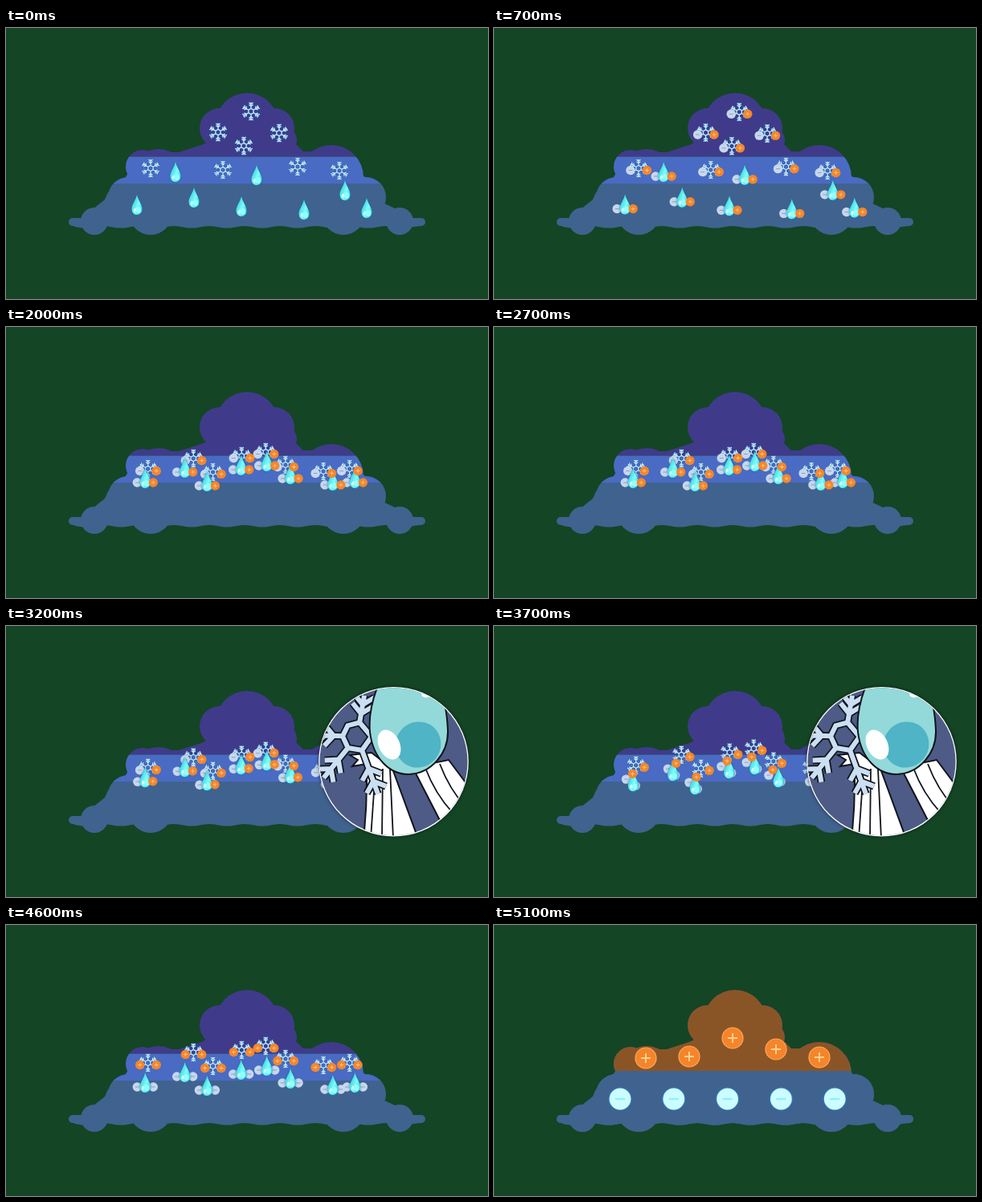
An HTML page with a canvas that plays this animation: 600x338 px, repeating every 5.2 s.

```html
<!DOCTYPE html>
<html lang="en">
<head>
<meta charset="utf-8">
<title>Charge separation in a storm cloud</title>
<style>
html, body { margin: 0; height: 100%; overflow: hidden; background: #144525; }
canvas { display: block; width: 100vw; height: 100vh; }
</style>
</head>
<body>
<canvas id="stage" width="600" height="338"></canvas>
<script>
const ctx = document.getElementById('stage').getContext('2d');
const LOOP = 5200, STEP = 100, TAU = Math.PI * 2, RAD = TAU / 360;

// Where each flake and drop start, and the point around which they collide
const pairs = [
  { flake: [180, 175], drop: [163, 221], meet: [175, 183] },
  { flake: [264, 130], drop: [211, 180], meet: [228, 170] },
  { flake: [270, 177], drop: [234, 212], meet: [254, 187] },
  { flake: [296, 147], drop: [293, 223], meet: [293, 167] },
  { flake: [305, 104], drop: [312, 184], meet: [324, 162] },
  { flake: [340, 131], drop: [371, 227], meet: [351, 178] },
  { flake: [363, 173], drop: [422, 203], meet: [401, 186] },
  { flake: [415, 178], drop: [449, 225], meet: [431, 183] }];

const ramp = (t, a, b) => Math.min(1, Math.max(0, (t - a) / (b - a)));
const smooth = (t, a, b) => { const k = ramp(t, a, b); return k * k * (3 - 2 * k); };
const mix = (a, b, k) => [a[0] + (b[0] - a[0]) * k, a[1] + (b[1] - a[1]) * k];
const shift = ([x, y], dx, dy) => [x + dx, y + dy];

// A rough body with round puffs, some of them mirrored about the middle
function cloudPath() {
  const path = new Path2D();
  const puff = (x, y, r) => { path.moveTo(x + r, y); path.arc(x, y, r, 0, TAU); };
  for (const side of [-1, 1]) {
    puff(300 + side * 217, 242, 5);
    puff(300 + side * 190, 241, 17);
    puff(300 + side * 148, 211, 25);
    puff(300 + side * 120, 231, 27);
    puff(300 + side * 34, 125, 25);
  }
  puff(300, 120, 39);
  puff(345, 140, 17);
  puff(405, 186, 40);
  puff(190, 186, 35);
  puff(170, 173, 21);
  const body = new Path2D('M83 237H94L108 226 123 214 127 205 149 186 166 155H215L243 146 300 120 362 146 370 154H385L446 185 467 217 482 224 504 237H517V247L400 240H200L83 247Z');
  path.addPath(body);
  path.moveTo(83, 240);
  path.lineTo(517, 240);
  for (let x = 517; x >= 83; x -= 4) path.lineTo(x, 248.3 + 1.3 * Math.sin(x / 7));
  path.closePath();
  return path;
}

// Arms are [angle, length]; a length of 0 leaves only the corner of the hub
function flakePath(cx, cy, hub, arms, branch) {
  const path = new Path2D();
  const at = (x, y, angle, r) => [x + Math.cos(angle) * r, y + Math.sin(angle) * r];
  arms.forEach(([angle], i) => path[i ? 'lineTo' : 'moveTo'](...at(cx, cy, angle, hub)));
  path.closePath();
  for (const [angle, length] of arms.filter(a => a[1])) {
    path.moveTo(...at(cx, cy, angle, hub));
    path.lineTo(...at(cx, cy, angle, length));
    for (const stop of [0.56, 0.78]) {
      const joint = at(cx, cy, angle, length * stop);
      path.moveTo(...at(...joint, angle - 0.85, branch));
      path.lineTo(...joint);
      path.lineTo(...at(...joint, angle + 0.85, branch));
    }
  }
  return path;
}

const cloud = cloudPath();
const dropPath = new Path2D('M0-13C1.5-6 6.5-1 6.5 5A6.5 7 0 0 1-6.5 5C-6.5-1-1.5-6 0-13Z');
const smallFlake = flakePath(0, 0, 3.6, Array.from({ length: 6 }, (_, i) => [(i * 60 - 90) * RAD, 11.3]), 3.4);
const bigFlake = flakePath(437, 138, 18,
  [[-80, 52], [0, 0], [70, 76], [129, 66], [182, 52], [230, 0]].map(([a, l]) => [a * RAD, l]), 17);

function ellipse(x, y, rx, ry, turn, fill) {
  ctx.beginPath();
  ctx.ellipse(x, y, rx, ry, turn, 0, TAU);
  ctx.fillStyle = fill;
  ctx.fill();
}
const disc = ([x, y], r, fill) => ellipse(x, y, r, r, 0, fill);

function shape(path, fill, stroke, width) {
  if (fill) { ctx.fillStyle = fill; ctx.fill(path); }
  if (stroke) { ctx.strokeStyle = stroke; ctx.lineWidth = width; ctx.stroke(path); }
}

function sign([x, y], size, plus, colour, width) {
  const path = new Path2D(`M${x - size} ${y}h${2 * size}`);
  if (plus) path.addPath(new Path2D(`M${x} ${y - size}v${2 * size}`));
  shape(path, null, colour, width);
}

function placed([x, y], draw) {
  ctx.save();
  ctx.translate(x, y);
  draw();
  ctx.restore();
}

function flake() {
  shape(smallFlake, null, '#27539b', 2.4);
  shape(smallFlake, null, '#c5edff', 1.3);
}

function drop() {
  const g = ctx.createLinearGradient(-6, 0, 7, 5);
  g.addColorStop(0, '#45d8e0');
  g.addColorStop(0.5, '#7dfcfa');
  g.addColorStop(1, '#36d2de');
  ctx.shadowColor = '#1b6aa0';
  ctx.shadowBlur = 3;
  shape(dropPath, g);
  ctx.shadowBlur = 0;
  ellipse(2, 6, 3.2, 4, 0, '#93fff9');
  ellipse(-2.7, 6, 1.4, 2.4, 0.3, '#e2ffff');
}

function charge(p, plus) {
  disc(p, 5.7, plus ? '#f5862b' : '#c6d8ed');
  sign(p, 2.4, plus, plus ? '#ffc184' : '#8fa1bd', 1);
}

function bands(list) {
  ctx.save();
  ctx.clip(cloud);
  for (const [y, end, colour] of list) {
    ctx.fillStyle = colour;
    ctx.fillRect(70, y, 460, end - y);
  }
  ctx.restore();
}

function particles(t) {
  const meet = smooth(t, 600, 2000), part = smooth(t, 3100, 4100);
  const shown = 1 - ramp(t, 4600, 4900);
  const poses = pairs.map(p => {
    const gapX = (p.drop[0] - p.flake[0]) * 0.1, gapY = 6;
    return {
      f: shift(mix(p.flake, shift(p.meet, -gapX, -gapY), meet), 0, -5 * part),
      d: shift(mix(p.drop, shift(p.meet, gapX, gapY), meet), 0, 8 * part)
    };
  });
  const withCharges = draw => {
    ctx.globalAlpha = shown * ramp(t, 100, 500);
    for (const { f, d } of poses)
      draw(shift(f, -10, 2.5), shift(f, 10.5, 2.5), shift(d, -10, 5), shift(d, 10, 5));
    ctx.globalAlpha = shown;
  };
  ctx.globalAlpha = shown;
  for (const { f } of poses) placed(f, flake);
  // Flakes give their minus to the drop and take its plus
  withCharges((fl, fr, dl, dr) => {
    charge(mix(fl, dl, part), false);
    charge(mix(dl, dr, part), false);
  });
  for (const { d } of poses) placed(d, drop);
  withCharges((fl, fr, dl, dr) => {
    charge(fr, true);
    charge(mix(dr, fl, part), true);
  });
  ctx.globalAlpha = 1;
}

function magnifier(scale) {
  if (!scale) return;
  const centre = [482.5, 169.3], ink = '#11141c';
  ctx.save();
  ctx.translate(...centre);
  ctx.scale(scale, scale);
  ctx.translate(-centre[0], -centre[1]);
  ctx.shadowColor = '#0008';
  ctx.shadowBlur = 4;
  disc(centre, 93.3, '#fff');
  ctx.shadowColor = 'transparent';
  disc(centre, 92, '#4d5b86');
  ctx.clip();
  shape(new Path2D('M428 161L455 158L481 178L514 268H445Q450 220 449 172L431 175L438 167Z'), '#fff', ink, 2);
  shape(new Path2D('M506 176L544 250L592 222L551 167Z'), '#fff', ink, 2);
  for (let i = 0; i < 3; i++)
    shape(new Path2D(`M${460 + 9 * i} 178L${454 + 14 * i} 265`), null, ink, 1.8);
  for (let i = 0; i < 2; i++)
    shape(new Path2D(`M${522 + 18 * i} ${177 - 5 * i}q12 32 34 56`), null, ink, 1.8);
  shape(bigFlake, null, ink, 9.5);
  shape(bigFlake, null, '#cbdff3', 6);
  shape(new Path2D('M469 60C456 88 451 111 453 132C457 166 478 185 501 185C530 184 551 158 550 130C549 108 546 88 534 60Z'), '#93d9d9', ink, 2);
  ellipse(513, 148, 28, 29, 0.7, '#4fb4c5');
  ellipse(477, 148, 13, 19.5, -0.45, '#fff');
  ellipse(524, 84, 7, 5, -0.3, '#fff');
  ctx.restore();
}

function separated(alpha) {
  if (!alpha) return;
  ctx.globalAlpha = alpha;
  bands([[75, 182, '#8a5526'], [182, 262, '#40628f']]);
  [166, 164, 141, 155, 165].forEach((y, i) => {
    const plus = [189 + i * 54, y], minus = [157 + i * 66.8, 217];
    disc(plus, 13.6, '#ffa75b');
    disc(plus, 12.4, '#f5842a');
    sign(plus, 6, true, '#ffd08c', 2);
    disc(minus, 14.6, '#3078ba');
    disc(minus, 13.4, '#cbfcff');
    sign(minus, 6, false, '#94eef7', 2.4);
  });
  ctx.globalAlpha = 1;
}

function render(now) {
  const t = Math.floor(now % LOOP / STEP) * STEP;
  ctx.fillStyle = '#144525';
  ctx.fillRect(0, 0, 600, 338);
  bands([[75, 160.5, '#3f3b8a'], [160.5, 194, '#496bc3'], [194, 262, '#40628f']]);
  particles(t);
  magnifier(smooth(t, 2700, 3100) * (1 - smooth(t, 4300, 4600)));
  separated(ramp(t, 4600, 5000));
}

let start;
function tick(now) {
  start ??= now;
  render(now - start);
  requestAnimationFrame(tick);
}
render(0);
requestAnimationFrame(tick);
</script>
</body>
</html>
```
